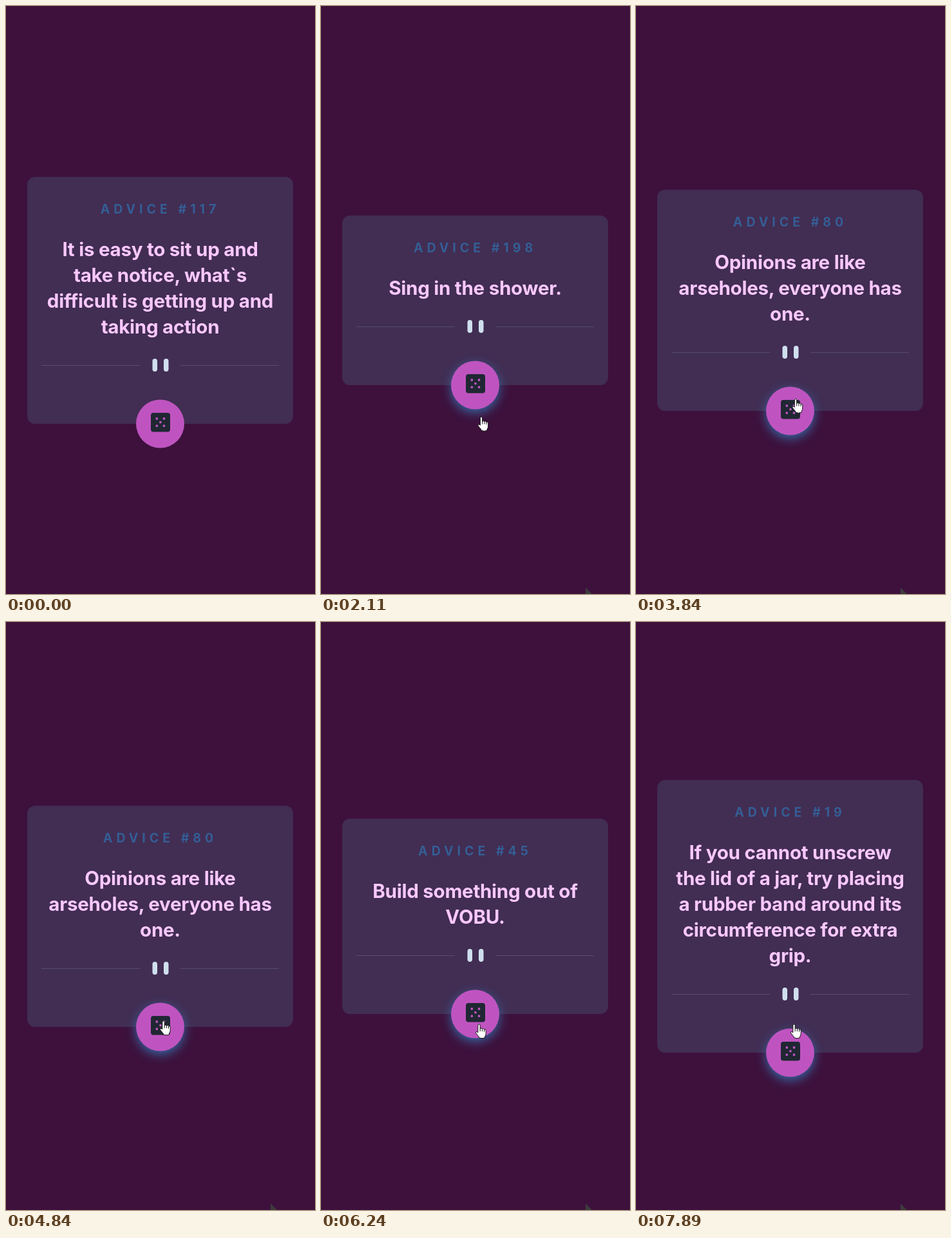
An HTML page that plays this animation: 480x912 px, repeating every 8 s.

```html
<!DOCTYPE html>
<html lang="en">
<head>
<meta charset="utf-8">
<title>Advice generator</title>
<style>
  html, body { margin: 0; width: 100%; height: 100%; overflow: hidden; background: #3d113c; }
  svg { display: block; width: 100%; height: 100%; }
  text { font-family: Inter, "Open Sans", sans-serif; font-weight: 700; text-anchor: middle; }
  #title { font-size: 19.5px; letter-spacing: 6px; fill: #345e95; }
  #quote { font-size: 29.5px; letter-spacing: -.25px; fill: #fac8ff; }
  #pointer path { stroke: #111; stroke-width: 1; stroke-linejoin: round; }
</style>
</head>
<body>
<svg viewBox="0 0 480 912">
  <defs>
    <filter id="blur" x="-50%" y="-50%" width="200%" height="200%"><feGaussianBlur stdDeviation="8"/></filter>
  </defs>
  <path id="corner" d="M411 902L421 912H411Z" fill="#3d3c3c"/>
  <rect id="card" x="33" width="413" rx="12" fill="#422d53"/>
  <text id="title" x="239.5"></text>
  <g id="quote"></g>
  <!-- origin: bottom edge of the card -->
  <g id="footer">
    <path d="M55 -90.5H208M271 -90.5H424" stroke="#534d70" stroke-width="1.2"/>
    <g fill="#cfe0ee">
      <rect x="227.5" y="-101" width="7.5" height="20" rx="3.7"/>
      <rect x="245" y="-101" width="7.5" height="20" rx="3.7"/>
    </g>
    <circle id="glow" cx="239.5" cy="5" r="37.5" fill="#3568a3" filter="url(#blur)"/>
    <circle cx="239.5" r="37.5" fill="#bf54c0"/>
    <rect x="225" y="-17" width="30" height="29.5" rx="4" fill="#202733"/>
    <path d="M234.3 -8h0M245.5 -8h0M239.9 -2.4h0M234.3 3.2h0M245.5 3.2h0"
      stroke="#bf54c0" stroke-width="3.8" stroke-linecap="round"/>
  </g>
  <g id="pointer">
    <path id="arrow" fill="#fff" d="M0 0V16.5L3.8 13 6.3 18.8 8.8 17.7 6.3 12H11.5Z"/>
    <g id="hand">
      <path fill="#fff" d="M-1.7 1.5Q0 -1 1.7 1.5V7.2Q3.8 5.6 4.9 7.6Q7 6.2 8 8.3Q10.5 7.3 10.7 10.2V15Q10.5 18 9 19.5V21.5Q4 23 .5 21.5Q-.5 19 -3 16.5Q-5.5 14 -5.2 12.6Q-3.8 11 -1.7 13.2Z"/>
      <path fill="none" d="M1.7 7V11.5M4.9 7.6V11.5M8 8.3V12"/>
    </g>
    <circle id="click" r="15" fill="#ff0" opacity=".47"/>
  </g>
</svg>
<script>
const LOOP = 8000, STEP = 67, HOVER_DELAY = 130;
const CENTER_X = 239.5, CENTER_Y = 456.5, BUTTON_RADIUS = 37.5;

const slips = [
  { at: 0, id: 117, lines: ["It is easy to sit up and", "take notice, what`s", "difficult is getting up and", "taking action"] },
  { at: 2110, id: 198, lines: ["Sing in the shower."] },
  { at: 3840, id: 80, lines: ["Opinions are like", "arseholes, everyone has", "one."] },
  { at: 5040, id: 200, lines: ["Sarcasm is the lowest", "form of wit. Employ", "correctly with apt", "timing."] },
  { at: 6240, id: 45, lines: ["Build something out of", "VOBU."] },
  { at: 7890, id: 19, lines: ["If you cannot unscrew", "the lid of a jar, try placing", "a rubber band around its", "circumference for extra", "grip."] }
];

// Pointer stops: time, x, y
const stops = [
  [180, 411, 902], [650, 248, 636], [1843, 248, 636], [1910, 249, 637],
  [2763, 249, 637], [2964, 250, 645], [3230, 248, 609], [4103, 248, 609],
  [4310, 244, 620], [4773, 244, 620], [4840, 244.5, 618.5],
  [5503, 244.5, 618.5], [5640, 245.5, 623.5]
];
const clicks = [[980, 1120], [3230, 3360], [4450, 4580], [5710, 5840], [7360, 7490]];

const el = id => document.getElementById(id);
const show = (id, on) => el(id).style.display = on ? "" : "none";
const slipAt = t => slips.findLast(s => s.at <= Math.max(t, 0));
const cardHeight = slip => 223 + 40 * slip.lines.length;
const cardBottom = slip => CENTER_Y + cardHeight(slip) / 2;

function pointerAt(t) {
  const i = stops.findLastIndex(s => s[0] <= t);
  const [start, x, y] = stops[i], next = stops[i + 1];
  if (!next) return [x, y];
  const elapsed = Math.floor((t - start) / STEP) * STEP;
  const p = elapsed / (next[0] - start), eased = 1 - (1 - p) ** 2;
  return [x + (next[1] - x) * eased, y + (next[2] - y) * eased];
}

let current;
function layOut(slip) {
  if (slip === current) return;
  current = slip;
  const height = cardHeight(slip), top = CENTER_Y - height / 2;
  el("card").setAttribute("y", top);
  el("card").setAttribute("height", height);
  el("title").setAttribute("y", top + 57);
  el("title").textContent = `ADVICE #${slip.id}`;
  el("quote").innerHTML = slip.lines
    .map((line, i) => `<text x="${CENTER_X}" y="${top + 123 + 40 * i}">${line}</text>`).join("");
  el("footer").setAttribute("transform", `translate(0 ${top + height})`);
}

function draw(t) {
  layOut(slipAt(t));
  const visible = t >= stops[0][0];
  let hover = false;
  if (visible) {
    const [x, y] = pointerAt(t);
    // Hover state catches up shortly after the card changes size
    const buttonY = cardBottom(slipAt(t - HOVER_DELAY));
    hover = Math.hypot(x - CENTER_X, y - buttonY) < BUTTON_RADIUS;
    // The old hover state persists until that update
    el("pointer").setAttribute("transform", `translate(${x} ${y})`);
  }
  show("pointer", visible);
  show("corner", visible);
  show("glow", hover);
  show("hand", hover);
  show("arrow", !hover);
  show("click", clicks.some(([from, to]) => t >= from && t < to));
}

const begin = performance.now();
function tick() {
  draw((performance.now() - begin) % LOOP);
  requestAnimationFrame(tick);
}
tick();
</script>
</body>
</html>
```
